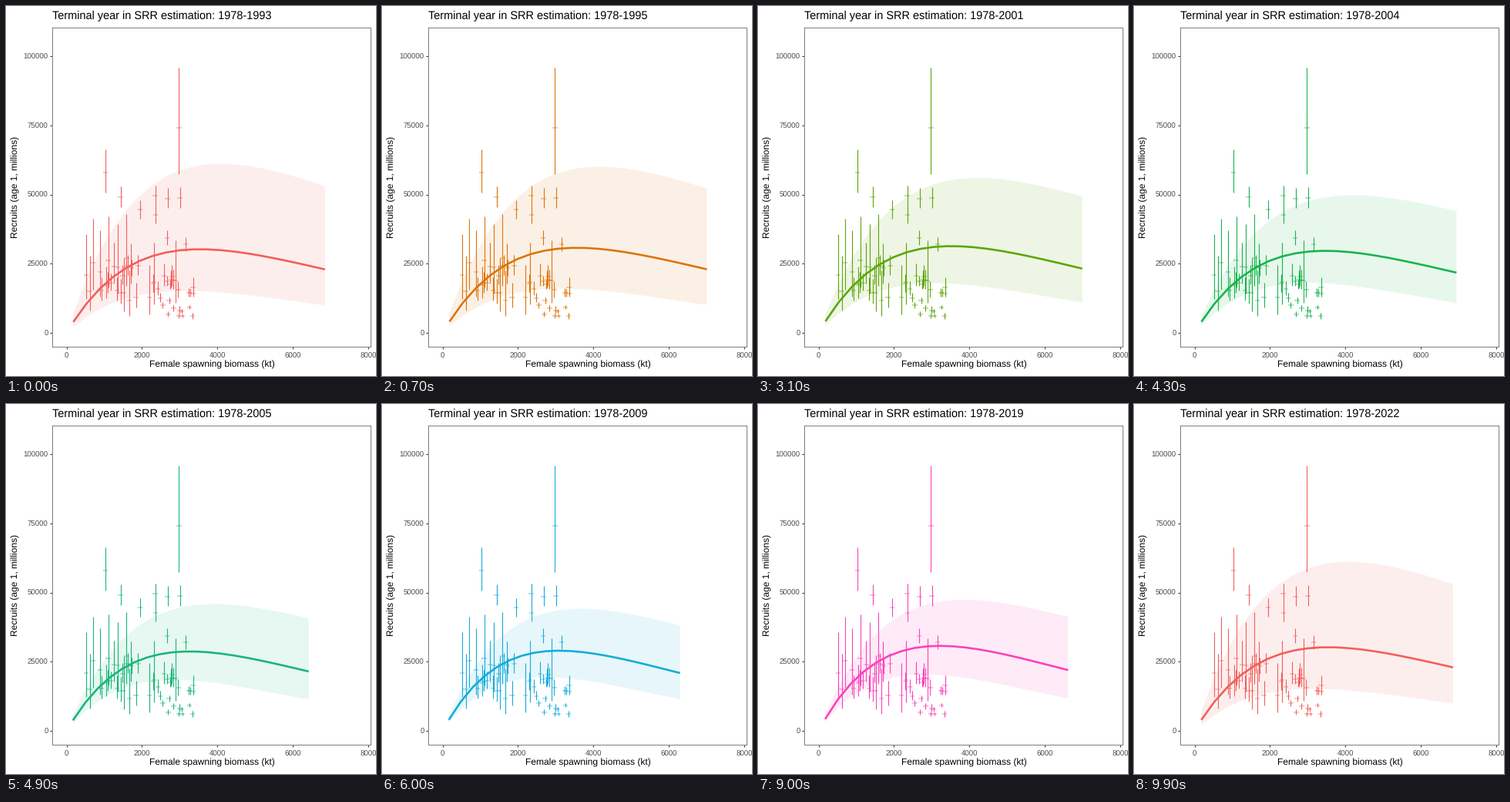
Animation of 480x480 px, one loop 10 s. Source, as a matplotlib script:

```python
import numpy as np
import matplotlib.pyplot as plt
from matplotlib.animation import FuncAnimation
from matplotlib.collections import LineCollection, PolyCollection

plt.rcParams.update({"font.family": "Liberation Sans", "text.hinting": "none"})

SIZE, DPI = 480, 72                            # one point equals one pixel
LEFT, RIGHT, TOP, BOTTOM = 60, 473, 28, 442
X0, KX = 78.6, 0.0489                          # pixels per kt
Y0, KY = 424, 0.003586                         # pixels per million recruits
FRAMES, STATES, FIRST = 100, 30, 1993

# Fit at a few states: state, reach (kt), peak biomass, peak recruits, band
KEYS = np.array([
    (0, 6855, 3540, 30240, .60),
    (1, 7137, 3600, 30500, .58),
    (4, 6760, 3480, 31300, .52),
    (5, 7075, 3560, 31650, .50),
    (8, 6994, 3520, 31370, .46),
    (10, 7300, 3600, 30300, .42),
    (12.5, 6422, 3265, 28720, .35),
    (16.5, 6300, 3088, 29000, .31),
    (23, 6648, 3227, 30810, .315),
    (29, 6600, 3210, 30700, .315),
]).T

# Notable observations: biomass (kt), recruits (thousand millions)
STRONG = [(1030, 58), (1432, 49.1), (1945, 44.6), (2350, 49.5), (2363, 42.8),
          (2668, 34.3), (2680, 48.6), (2980, 74.2), (3008, 48.8), (3160, 32)]
VAGUE = [(522, 20.9), (614, 15.1), (706, 25.4), (890, 22), (1105, 26.2),
         (1360, 23.7), (1513, 14.5), (1590, 27), (1662, 11.7), (2200, 12.9),
         (2325, 18.4), (2885, 19)]


def observations():
    """Rows of biomass, recruits and log spread; minor years are random."""
    rng = np.random.default_rng(12)
    x, y = np.array(STRONG).T
    strong = x, y, 0.075 + 0.0075 * np.maximum(y - 50, 0)
    x, y = np.array(VAGUE).T
    vague = x, y, 0.8 - 0.0125 * y
    x = np.linspace(940, 1920, 13) + rng.uniform(-30, 30, 13)
    early = x, rng.uniform(12, 25, 13), rng.uniform(0.12, 0.35, 13)
    x = np.sort(rng.triangular(2000, 2650, 3650, 24))
    y = rng.uniform(5, 30 - 0.005 * (x - 1000))
    late = x, y, rng.uniform(0.08, 0.2, 24)
    return np.hstack([strong, vague, early, late])


def rgb_to_xyz(primaries):
    m = np.array([[x / y, 1, (1 - x - y) / y] for x, y in primaries]).T
    return m * np.linalg.solve(m, [0.9505, 1, 1.0888])


SRGB = rgb_to_xyz([(.64, .33), (.30, .60), (.15, .06)])
GENERIC = rgb_to_xyz([(.6295, .3407), (.2949, .6055), (.1551, .0762)])


def hue_color(t, chroma=100, light=65):
    """Evenly spaced HCL hue, shown through a gamma 1.8 profile."""
    h = np.radians(15 + 360 * t / STATES)
    u = chroma * np.cos(h) / (13 * light) + 0.19784
    v = chroma * np.sin(h) / (13 * light) + 0.46834
    y = ((light + 16) / 116) ** 3
    x = 9 * y * u / (4 * v)
    z = 3 * y / v - 5 * y - x / 3
    linear = np.clip(np.linalg.solve(SRGB, [x, y, z]), 0, 1)
    shown = np.linalg.solve(GENERIC, SRGB @ linear)
    return tuple(np.clip(shown, 0, 1) ** (1 / 1.8))


def fit(t):
    """Ricker curve with its lognormal band: x, lower, median, upper."""
    reach, mode, peak, width = (np.interp(t % STATES, KEYS[0], row)
                                for row in KEYS[1:])
    x = np.linspace(0.026 * reach, reach, 20)
    s = x / mode
    mid = peak * s * np.exp(1 - s)
    u = x / 7000
    w = width + 0.13 * u + (0.32 - 0.34 * width) * u ** 2
    return x, mid * np.exp(-w), mid, mid * np.exp(w)


def state_at(k):
    """Long holds first, then one halfway step before each new state."""
    if k < 46:
        return min((k + 1) // 4, 11)
    if k == FRAMES - 1:
        return STATES
    n, step = divmod(k - 46 + (k >= 54), 3)
    return 11 + n + (1 if step else 0.5)


fig = plt.figure(figsize=(SIZE / DPI, SIZE / DPI), dpi=DPI, facecolor="white")
ax = fig.add_axes([LEFT / SIZE, 1 - BOTTOM / SIZE,
                   (RIGHT - LEFT) / SIZE, (BOTTOM - TOP) / SIZE])
ax.set_xlim((LEFT - X0) / KX, (RIGHT - X0) / KX)
ax.set_ylim((Y0 - BOTTOM) / KY, (Y0 - TOP) / KY)
ax.set_xticks(range(0, 8001, 2000))
ax.set_yticks(range(0, 100001, 25000))
ax.tick_params(length=3, width=1, pad=2.3, color="#333333",
               labelcolor="#4d4d4d", labelsize=9.6)
ax.tick_params(axis="x", pad=4.3)
for side in ax.spines.values():
    side.set(color="#7f7f7f", linewidth=1)


def label(x, y, text, size, **kw):
    return fig.text(x / SIZE, 1 - y / SIZE, text, fontsize=size,
                    va="baseline", color="black", **kw)


title = label(60, 17, "", 14.5)
label(267, 469, "Female spawning biomass (kt)", 12, ha="center")
label(16, 235, "Recruits (age 1, millions)", 12, ha="center",
      rotation=90, rotation_mode="anchor")

bx, by, spread = observations()
by, factor = by * 1000, np.exp(spread)
half = 3.2 / KX
dashes = LineCollection([[(x - half, y), (x + half, y)]
                         for x, y in zip(bx, by)], linewidths=2, alpha=0.35)
bars = LineCollection([[(x, y / f), (x, y * f)]
                       for x, y, f in zip(bx, by, factor)], linewidths=1.1)
band = PolyCollection([], alpha=0.1, linewidths=0)
for part in (dashes, bars, band):
    ax.add_collection(part, autolim=False)
curve, = ax.plot([], [], lw=2.6, solid_capstyle="butt", zorder=3)


def draw(k):
    t = state_at(k)
    color = hue_color(t)
    x, low, mid, high = fit(t)
    band.set_verts([np.column_stack([np.r_[x, x[::-1]],
                                     np.r_[low, high[::-1]]])])
    band.set_facecolor(color)
    curve.set_data(x, mid)
    for part in (dashes, bars, curve):
        part.set_color(color)
    year = FIRST + min(int(np.ceil(t - 0.5)), STATES - 1)
    title.set_text(f"Terminal year in SRR estimation: 1978-{year}")
    return band, dashes, bars, curve, title


anim = FuncAnimation(fig, draw, frames=FRAMES, interval=100,
                     repeat=True, repeat_delay=0, blit=False)
plt.show()
```
